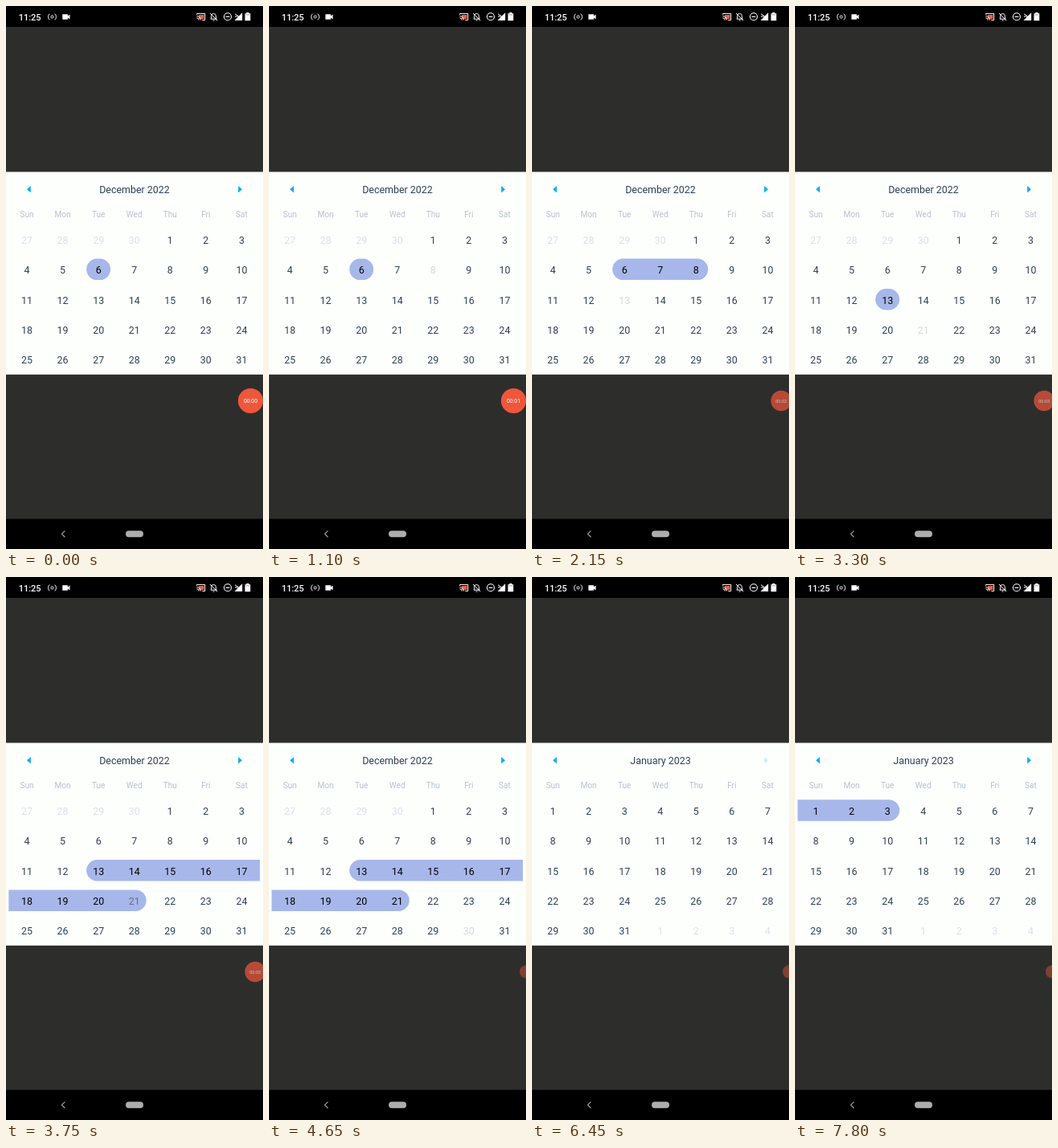
An HTML page for the animation above (8000 ms loop, 320x676 px).

```html
<!DOCTYPE html>
<html lang="en">
<head>
<meta charset="utf-8">
<title>Calendar range picker</title>
<style>
html, body { margin: 0; width: 100%; height: 100%; overflow: hidden; background: #000; }
svg { display: block; width: 320px; height: 676px; font-family: Roboto, sans-serif; text-anchor: middle; }
.day, .title { font-size: 12.45px; fill: #2d4150; }
.dow { font-size: 10.1px; fill: #b6c1cd; }
.off { fill: #d9e1e8; }
.band { fill: #a7b7ea; }
.sel .day { fill: #000; }
.arrow { fill: #00adf5; }

.anim { animation: 8s step-end infinite; }
#dec { animation-name: december; }
#jan { animation-name: january; }
#next { animation-name: next; }
@keyframes december { 0% { visibility: visible } 80.625%, 100% { visibility: hidden } }
@keyframes january { 0% { visibility: hidden } 80.625%, 100% { visibility: visible } }
@keyframes next {
  0% { opacity: 1 }
  73.75% { opacity: .2 }
  80.625% { opacity: .2; animation-timing-function: steps(5, end) }
  83.75%, 100% { opacity: 1 }
}

/* selected ranges */
@keyframes r6 { 0% { visibility: visible } 15%, 100% { visibility: hidden } }
@keyframes r6-8 { 0% { visibility: hidden } 15% { visibility: visible } 32.5%, 100% { visibility: hidden } }
@keyframes r13 { 0% { visibility: hidden } 32.5% { visibility: visible } 46.875%, 100% { visibility: hidden } }
@keyframes r13-21 { 0% { visibility: hidden } 46.875% { visibility: visible } 65%, 100% { visibility: hidden } }
@keyframes r30 { 0% { visibility: hidden } 65% { visibility: visible } 80.625%, 100% { visibility: hidden } }
@keyframes r1-3 { 0% { visibility: hidden } 96.25%, 100% { visibility: visible } }

/* touch feedback on single days */
@keyframes press8 { 0% { opacity: 1 } 13.75% { opacity: .2 } 16%, 100% { opacity: 1 } }
@keyframes press13 { 0% { opacity: 1 } 26.25% { opacity: .6 } 26.875% { opacity: .2 } 33%, 100% { opacity: 1 } }
@keyframes press21 { 0% { opacity: 1 } 40% { opacity: .7 } 40.625% { opacity: .4 } 41.25% { opacity: .2 } 48%, 100% { opacity: 1 } }
@keyframes press30 { 0% { opacity: 1 } 58.125% { opacity: .2 } 66%, 100% { opacity: 1 } }
@keyframes press3 { 0% { opacity: 1 } 89.375%, 100% { opacity: .2 } }
@keyframes release { 0% { opacity: .4 } 1.25%, 100% { opacity: 1 } }

/* recorder bubble */
#bubble { animation-name: bubble; }
#bubble text { font-size: 6.9px; fill: #fff; visibility: hidden; animation-name: tick; }
@keyframes tick { 0% { visibility: visible } 12.5%, 100% { visibility: hidden } }
@keyframes bubble {
  0% { transform: translate(304.5px, 491.5px); opacity: 1 }
  25% { transform: translate(304.5px, 491.5px); opacity: 1; animation-timing-function: steps(3, end) }
  26.875% { transform: translate(310.2px, 491.5px) scale(.82); opacity: .72 }
  50% { transform: translate(315px, 491.5px) scale(.68); opacity: .6 }
  51.25%, 100% { transform: translate(320px, 491.5px) scale(.52); opacity: .45 }
}
</style>
</head>
<body>
<svg id="stage" viewBox="0 0 320 676">
  <rect width="320" height="676"/>
  <rect y="26" width="320" height="612.5" fill="#2d2e2c"/>

  <g fill="#fff">
    <text x="29.6" y="17.6" font-size="11" font-weight="500">11:25</text>
    <circle cx="57.5" cy="13.5" r="1.6" fill="none" stroke="#fff"/>
    <path d="M54.3 9.7a5 5 0 0 0 0 7.6M60.7 9.7a5 5 0 0 1 0 7.6" fill="none" stroke="#fff"/>
    <path d="M70.3 10.2h6.6v2.4l2.6-2v5.8l-2.6-2v2.4h-6.6z"/>
  </g>
  <g fill="none" stroke="#fff">
    <rect x="240" y="11" width="6.5" height="5.2" fill="#e8604a" stroke="none"/>
    <path d="M237.7 11V9.4h10v8.2h-3.4M237.4 12.6a5 5 0 0 1 5 5M237.4 14.8a2.8 2.8 0 0 1 2.8 2.8"/>
    <path d="M255 16.2h7.4l-1-1.2v-2.6a2.9 2.9 0 0 0-5.8 0V15zM257.5 18h2M254 9l9.2 9.2"/>
    <circle cx="276" cy="13.3" r="4.5" stroke-width="1.1"/>
    <path d="M273.6 13.3h4.8" stroke-width="1.2"/>
  </g>
  <path d="M294.2 8.3v9.7h-9.7z" fill="#fff"/>
  <path d="M285 9.8l4 2.6M285 13l9 0" stroke="#fff" stroke-width="1"/>
  <path d="M299.3 8h3.2v1.2h1.8v9h-6.8v-9h1.8z" fill="#fff"/>
  <path d="M298.4 10.9h5" stroke="#777" stroke-width=".7"/>

  <rect y="206.5" width="320" height="252.3" fill="#fdfffd"/>
  <path class="arrow" d="M26 228.2l4.8-4.2v8.4z"/>
  <path class="arrow anim" id="next" d="M294 228.2l-4.8-4.2v8.4z"/>
  <g id="week"></g>
  <g id="dec" class="anim"><text class="title" x="160" y="233.2">December 2022</text></g>
  <g id="jan" class="anim"><text class="title" x="160" y="233.2">January 2023</text></g>

  <g id="bubble" class="anim"><circle r="15.6" fill="#ef563c"/></g>

  <path d="M73.4 653.4l-4 3.9 4 3.9" fill="none" stroke="#9c9c9c" stroke-width="1.2"/>
  <rect x="149" y="653.3" width="22" height="8" rx="4" fill="#adadad"/>
</svg>
<script>
const $ = id => document.getElementById(id);
const colX = c => 26 + 44.57 * c;

function add(parent, tag, attrs, text = '') {
  const el = document.createElementNS('http://www.w3.org/2000/svg', tag);
  for (const k in attrs) el.setAttribute(k, attrs[k]);
  el.textContent = text;
  return parent.appendChild(el);
}

function animate(el, name, delay = 0) {
  el.classList.add('anim');
  el.style.animationName = name;
  el.style.animationDelay = delay + 'ms';
}

function addDay(parent, cell, label, off) {
  const x = colX(cell % 7), y = 295.8 + 37.4 * Math.floor(cell / 7);
  return add(parent, 'text', { class: off ? 'day off' : 'day', x, y }, label);
}

// lead: days of the previous month shown in the first row
function buildMonth(id, lead, pressed) {
  for (let cell = 0; cell < 35; cell++) {
    const n = cell - lead + 1;
    const off = n < 1 || n > 31;
    const el = addDay($(id), cell, n < 1 ? n + 30 : n > 31 ? n - 31 : n, off);
    if (!off && pressed.includes(n)) animate(el, 'press' + n);
  }
}

function addRange(id, lead, from, to, releaseAt) {
  const g = add($(id), 'g', { class: 'sel' });
  animate(g, from === to ? 'r' + from : `r${from}-${to}`);
  const first = from + lead - 1, last = to + lead - 1, h = 26.5;
  for (let row = Math.floor(first / 7); row <= Math.floor(last / 7); row++) {
    const a = Math.max(first, row * 7), b = Math.min(last, row * 7 + 6);
    const roundL = a === first && from > 1 ? h / 2 : 0;
    const roundR = b === last ? h / 2 : 0;
    const x0 = colX(a % 7) + (roundL ? -15 : -22.7);
    const x1 = colX(b % 7) + (roundR ? 15 : 22.7);
    const y = 277.2 + 37.4 * row;
    add(g, 'path', {
      class: 'band',
      d: `M${x0 + roundL} ${y}H${x1 - roundR}a${roundR} ${roundR} 0 0 1 0 ${h}` +
         `H${x0 + roundL}a${roundL} ${roundL} 0 0 1 0 ${-h}z`
    });
  }
  for (let n = from; n <= to; n++) {
    const el = addDay(g, n + lead - 1, n);
    if (n === to && releaseAt) animate(el, 'release', releaseAt);
  }
}

['Sun', 'Mon', 'Tue', 'Wed', 'Thu', 'Fri', 'Sat'].forEach((d, i) =>
  add($('week'), 'text', { class: 'dow', x: colX(i), y: 263.3 }, d));

buildMonth('dec', 4, [8, 13, 21, 30]);
addRange('dec', 4, 6, 6);
addRange('dec', 4, 6, 8, 1200);
addRange('dec', 4, 13, 13, 2600);
addRange('dec', 4, 13, 21, 3750);
addRange('dec', 4, 30, 30, 5200);

buildMonth('jan', 0, [3]);
addRange('jan', 0, 1, 3, 7700);

for (let s = 0; s < 4; s++)
  animate(add($('bubble'), 'text', { y: 2.6 }, '00:0' + s), 'tick', s * 1000);
</script>
</body>
</html>
```
